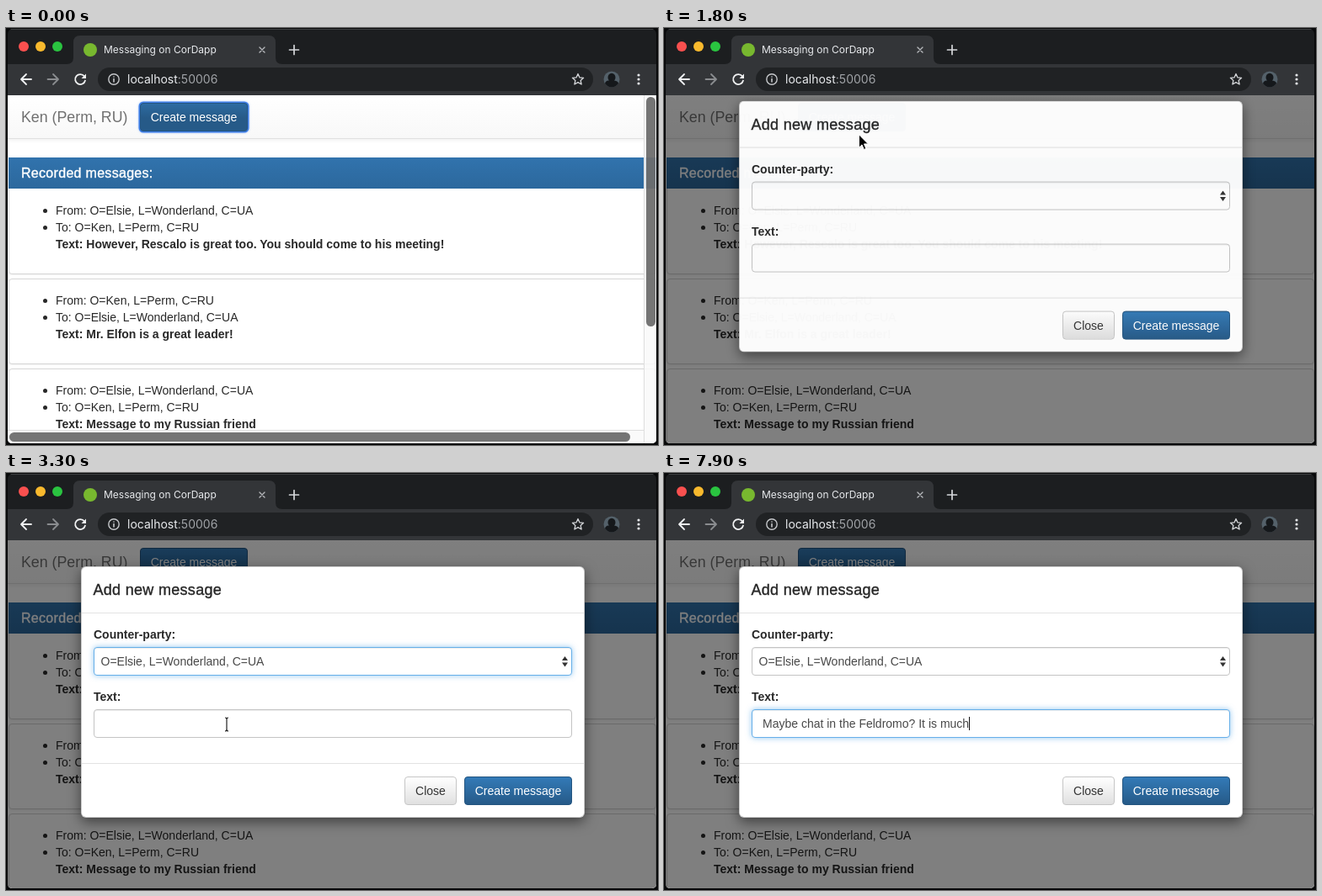
Write an HTML page that moves like this. It is 774 px wide and 496 px high and loops after 8000 ms.

```html
<!DOCTYPE html>
<html lang="en">
<head>
<meta charset="utf-8">
<title>Messaging on CorDapp</title>
<style>
  html, body { margin: 0; width: 100%; height: 100%; overflow: hidden; background: #08090a; }
  * { box-sizing: border-box; }
  body { font: 14px/20px "Liberation Sans", Arial, sans-serif; color: #282828; }
  #stage { position: absolute; left: 0; top: 0; width: 774px; height: 496px; overflow: hidden; }
  #stage div, #stage svg { position: absolute; }
  .fill { left: 0; top: 0; width: 774px; height: 496px; }
  .text { white-space: pre; }
  .ui { font-family: Inter, Roboto, sans-serif; color: #e8eaed; }
  .bold { font-weight: bold; }
  .medium { letter-spacing: .3px; -webkit-text-stroke: .4px currentColor; }

  #page { left: 2px; top: 80px; width: 770px; height: 414px; overflow: hidden; background: #fff; border-radius: 0 0 5px 5px; }
  #sheet { left: -2px; top: -80px; }
  .navbar { background: linear-gradient(#fff, #f8f8f8); border-bottom: 1px solid #e0e0e0; box-shadow: 0 1px 5px rgba(0,0,0,.075); }
  .panel { background: #fff; border: 1px solid #d6d6d6; border-radius: 4px; box-shadow: 0 1px 2px rgba(0,0,0,.06); }
  .heading { background: linear-gradient(#3173ad, #2c689d); }
  .bullet { background: #282828; border-radius: 50%; }

  .btn { border: 1px solid #245580; border-radius: 4px; padding: 6px 0; text-align: center; color: #fff;
         background: #265a88 linear-gradient(#337ab7, #265a88) repeat-x; white-space: pre; }
  .btn.plain { color: #333; border-color: #c6c6c6; background: linear-gradient(#fff, #e0e0e0); }
  .btn.focus { background-position: 0 -15px; box-shadow: 0 0 0 1.5px #3f7fe8, 0 0 3px 1px #6ea2f5; }
  .field { border: 1px solid #c4c4c4; border-radius: 4px; background: #fff; box-shadow: inset 0 1px 1px rgba(0,0,0,.075);
           padding: 6px 12px; white-space: pre; color: #484848; }
  .field.select { padding-left: 7.5px; }
  .field.focus { border-color: #66afe9; box-shadow: inset 0 1px 1px rgba(0,0,0,.075), 0 0 7px rgba(102,175,233,.7); }
  .dialog { background: #fff; border: 1px solid rgba(0,0,0,.2); border-radius: 6px; box-shadow: 0 5px 15px rgba(0,0,0,.5); }
  .rule { background: #e2e2e2; }
  #caret { width: 1px; background: #111; }

  .menu { background: linear-gradient(#707070, #595959); border: 1px solid #444; border-radius: 5px; box-shadow: 0 5px 12px rgba(0,0,0,.35); }
  .pick { background: linear-gradient(#4595f8, #3b88f3); }
  .option { color: #fff; letter-spacing: .12px; -webkit-text-stroke: .35px #fff; white-space: pre; }
  .track { background: rgba(250,250,250,.88); border: 0 solid #dedede; }
  .thumb { background: rgba(0,0,0,.53); border-radius: 6px; }
  #bubble { background: #2d2e31; border-radius: 0 4px 0 0; font-size: 12px; color: #a4a6a9; padding-left: 3px; white-space: pre; }
</style>
</head>
<body>
<div id="stage">
  <svg class="fill" viewBox="0 0 774 496" fill="none" stroke-linecap="round" stroke-linejoin="round">
    <rect x="2" y="1" width="770" height="90" rx="6" fill="#1c1e20"/>
    <path d="M6 1.5H768" stroke="#404244"/>
    <path d="M2 43H72Q80 43 80 35V17Q80 9 88 9H312Q320 9 320 17V35Q320 43 328 43H772V80H2Z" fill="#333538"/>
    <rect x="109" y="47" width="588" height="28" rx="14" fill="#202224"/>
    <circle cx="21" cy="22" r="6" fill="#f9504f"/>
    <circle cx="41" cy="22" r="6" fill="#f8b92d"/>
    <circle cx="61" cy="22" r="6" fill="#2ac440"/>
    <circle cx="100" cy="26" r="8" fill="#78b82f"/>
    <path d="M301 23l6 6m0-6l-6 6" stroke="#b5b7ba" stroke-width="1.4"/>
    <path d="M342 20.500v11M336.500 26h11" stroke="#d5d7da" stroke-width="1.7"/>
    <path d="M30 61H18.500M24 55l-6 6 6 6" stroke="#f0f1f2" stroke-width="1.8"/>
    <path d="M49.500 61H61M56 55l6 6-6 6" stroke="#8a8c8f" stroke-width="1.8"/>
    <path d="M93 57.500A6 6 0 1 0 94 62.500" stroke="#f0f1f2" stroke-width="1.8"/>
    <path d="M95 54.500v5.500h-5.500z" fill="#f0f1f2"/>
    <circle cx="128" cy="61" r="6.200" stroke="#c6c8cb" stroke-width="1.4"/>
    <path d="M128 60.500v3.500M128 58v.1" stroke="#c6c8cb" stroke-width="1.6"/>
    <path d="M679 54.500l1.900 4.300 4.700.5-3.500 3.100 1 4.600-4.100-2.400-4.100 2.400 1-4.600-3.500-3.100 4.700-.5z" stroke="#d5d7da" stroke-width="1.300"/>
    <circle cx="719" cy="61" r="9.500" fill="#54616a"/>
    <path d="M711 66Q712 62 716 62.500A4.500 5 0 1 1 722 62.500Q727 63 727 66A9.500 9.500 0 0 1 711 66Z" fill="#15181b"/>
    <g fill="#e3e5e8"><circle cx="751" cy="56" r="1.600"/><circle cx="751" cy="61" r="1.600"/><circle cx="751" cy="66" r="1.600"/></g>
  </svg>
  <div class="text ui" style="left:116px;top:16px;font-size:12px">Messaging on CorDapp</div>
  <div class="text ui" style="left:144px;top:51px">localhost<span style="color:#a0a3a7">:50006</span></div>
  <div id="page"><div id="sheet" class="fill"></div></div>
  <svg id="cursor" width="24" height="26" viewBox="-3 -3 24 26" stroke-linejoin="round">
    <path id="arrow" d="M0 0V15.500L3.600 12.200 6 17.800 8.500 16.700 6.100 11.200H11Z" fill="#000" stroke="#fff"/>
    <path id="hand" d="M1.500 1.500C1.500-.5 4-.5 4 1.500V6.500C4.500 5.300 6.400 5.500 6.500 7 7.200 6 8.900 6.400 8.900 7.800 9.800 7 11.300 7.500 11.300 9V12L9.800 16.500H3.500L-1.500 10.500C-2.500 8.800-.5 7.800 1.500 10Z" fill="#fff" stroke="#000"/>
    <path id="beam" d="M-2-1Q0-1 0 1V13Q0 15-2 15M2-1Q0-1 0 1M0 13Q0 15 2 15" fill="none" stroke="#222" stroke-width="1.200"/>
  </svg>
</div>
<script>
const $ = id => document.getElementById(id);
const LOOP = 8000, STEP = 100;

function box(parent, cls, x, y, w, h, text = '') {
  const el = document.createElement('div');
  el.className = cls;
  el.style.cssText = `left:${x}px;top:${y}px;` + (w ? `width:${w}px;height:${h}px;` : '');
  el.textContent = text;
  parent.append(el);
  return el;
}
const label = (parent, cls, x, y, text, size = 14) => {
  const el = box(parent, 'text ' + cls, x, y, 0, 0, text);
  el.style.fontSize = size + 'px';
  return el;
};
const layer = parent => box(parent, 'fill', 0, 0);
const show = (el, on) => { el.style.visibility = on ? 'visible' : 'hidden'; };

// Page
const sheet = $('sheet');
const ken = 'O=Ken, L=Perm, C=RU', elsie = 'O=Elsie, L=Wonderland, C=UA', kay = 'O=Kay, L=Neverland, C=US';
const messages = [
  [elsie, ken, 'However, Rescalo is great too. You should come to his meeting!'],
  [ken, elsie, 'Mr. Elfon is a great leader!'],
  [elsie, ken, 'Message to my Russian friend'],
];
box(sheet, 'navbar', 2, 80, 770, 52);
label(sheet, '', 18, 96, 'Ken (Perm, RU)', 17.8).style.color = '#707070';
const openButton = box(sheet, 'btn', 159, 89, 128, 34, 'Create message');
messages.forEach(([from, to, text], i) => {
  const y = 191 + i * 107;
  box(sheet, 'panel', 3, i ? y : 154, 769, i ? 102 : 139);
  ['From: ' + from, 'To: ' + to].forEach((line, k) => {
    box(sheet, 'bullet', 44, y + 24 + k * 20, 5, 5);
    label(sheet, '', 59, y + 16 + k * 20, line);
  });
  label(sheet, 'bold', 59, y + 56, 'Text: ' + text);
});
box(sheet, 'heading', 3, 154, 769, 37);
label(sheet, 'medium', 18, 163, 'Recorded messages:', 16).style.color = '#fff';

const bars = layer(sheet);
box(bars, 'track', 757, 80, 15, 414).style.borderLeftWidth = '1px';
box(bars, 'track', 2, 478, 755, 16).style.borderTopWidth = '1px';
box(bars, 'thumb', 760, 82, 11, 273);
box(bars, 'thumb', 4, 481, 737, 11);

const backdrop = layer(sheet);
backdrop.style.background = 'rgba(0,0,0,.5)';

// Dialog
const modal = layer(sheet);
box(modal, 'dialog', 89, 111, 598, 299);
label(modal, 'medium', 103.5, 129, 'Add new message', 18);
box(modal, 'rule', 90, 166, 596, 1);
label(modal, 'bold', 104, 182, 'Counter-party:');
const select = box(modal, 'field select', 104, 207, 568, 34);
const chevrons = box(modal, '', 659, 218, 9, 13);
chevrons.innerHTML = '<svg width="9" height="13"><path d="M1 5L4.500 0 8 5ZM1 7.500L4.500 12.500 8 7.500Z" fill="#333"/></svg>';
label(modal, 'bold', 104, 256, 'Text:');
const input = box(modal, 'field', 104, 281, 568, 34);
const typed = label(modal, '', 117, 288, '');
typed.style.color = '#484848';
const caret = box(modal, '', 117, 290, 1, 16);
caret.id = 'caret';
box(modal, 'rule', 90, 345, 596, 1);
box(modal, 'btn plain', 473, 361, 62, 34, 'Close');
box(modal, 'btn', 544, 361, 128, 34, 'Create message');

// Drop-down list
const menu = layer(sheet);
box(menu, 'menu', 92, 209, 571, 66);
const pick = box(menu, 'pick', 93, 213, 569, 19);
const options = layer(menu);
box(options, '', 97, 217, 11, 11).innerHTML =
  '<svg width="11" height="11"><path d="M1.500 6L4.500 9 9.500 1.500" fill="none" stroke="#fff" stroke-width="1.800"/></svg>';
box(options, 'option', 114, 231, 0, 0, kay);
box(options, 'option', 114, 250, 0, 0, elsie);

const bubble = box(sheet, 'ui', 2, 473, 256, 21, 'localhost:50006/#');
bubble.id = 'bubble';

// Motion
const SENTENCE = 'Maybe chat in the Feldromo? It is much';
const keys = [ // time, characters typed
  [3700, 1], [3800, 3], [3900, 4], [4000, 6], [4100, 7], [4200, 8], [4300, 10], [4400, 11],
  [4700, 13], [4800, 14], [4900, 16], [5000, 18], [5200, 19], [5300, 20], [5400, 21], [5500, 22],
  [6200, 23], [6300, 25], [6400, 26], [6600, 27], [6800, 28],
  [7000, 29], [7100, 30], [7200, 31], [7300, 33], [7400, 34], [7600, 35], [7700, 36], [7900, 38],
];
const path = [ // time, x, y of the pointer
  [900, -12, 270], [1400, 220, 111], [1700, 220, 110], [2100, 293, 217], [2200, 293, 217],
  [2600, 278, 259], [2900, 278, 259], [3300, 262, 292],
];
const OPEN = 1700, MENU = 2100, CHOSEN = 2700, FOCUS = 3500, TYPE = 3700;

function pointerAt(t) {
  const next = path.findIndex(p => p[0] > t);
  if (next < 1) return path[next ? path.length - 1 : 0].slice(1);
  const [t0, x0, y0] = path[next - 1], [t1, x1, y1] = path[next];
  const p = (t - t0) / (t1 - t0), s = p * p * (3 - 2 * p);
  return [x0 + (x1 - x0) * s, y0 + (y1 - y0) * s];
}
const inside = (x, y, l, t, r, b) => x > l && x < r && y > t && y < b;

function render(t) {
  const [x, y] = pointerAt(t);
  const open = t >= OPEN;
  const hover = !open && inside(x, y, 159, 89, 287, 123);
  const writing = t > CHOSEN + STEP && inside(x, y, 104, 281, 672, 315);

  openButton.classList.toggle('focus', !open);
  show(bars, !open);
  show(backdrop, open);
  show(bubble, hover || t === OPEN);
  bubble.style.opacity = open ? .72 : 1;

  const age = t - OPEN + 45;
  modal.style.opacity = open ? Math.min(1, age / 150) : 0;
  modal.style.transform = `translateY(${-75 * (1 - Math.min(1, Math.max(0, age / 300))) ** 1.7}px)`;

  menu.style.display = t >= MENU && t < CHOSEN + 2 * STEP ? '' : 'none';
  const fade = t < CHOSEN ? 1 : t === CHOSEN ? .58 : .2;
  menu.children[0].style.opacity = pick.style.opacity = fade;
  options.style.opacity = t > CHOSEN ? .3 : 1;
  pick.style.top = 213 + 19 * Math.min(2, Math.max(0, Math.floor((y - 213) / 19))) + 'px';
  select.textContent = t > CHOSEN ? elsie : '';
  select.classList.toggle('focus', t >= MENU && t < FOCUS);

  input.classList.toggle('focus', t >= FOCUS);
  const count = keys.reduce((n, [at, c]) => t >= at ? c : n, 0);
  typed.textContent = SENTENCE.slice(0, count);
  caret.style.left = Math.floor(117.5 + typed.getBoundingClientRect().width) + 'px';
  caret.style.display = t >= FOCUS && !(t >= 5700 && t < 6000) ? '' : 'none';

  $('cursor').style.display = t >= 900 && t < TYPE ? '' : 'none';
  $('cursor').style.transform = `translate(${x - 3}px,${y - 3}px)`;
  $('hand').style.display = hover ? '' : 'none';
  $('beam').style.display = writing ? '' : 'none';
  $('arrow').style.display = hover || writing ? 'none' : '';
}

const start = performance.now();
let last = -1;
function frame() {
  const t = Math.floor((performance.now() - start) % LOOP / STEP) * STEP;
  if (t !== last) render(last = t);
  requestAnimationFrame(frame);
}
frame();
</script>
</body>
</html>
```
